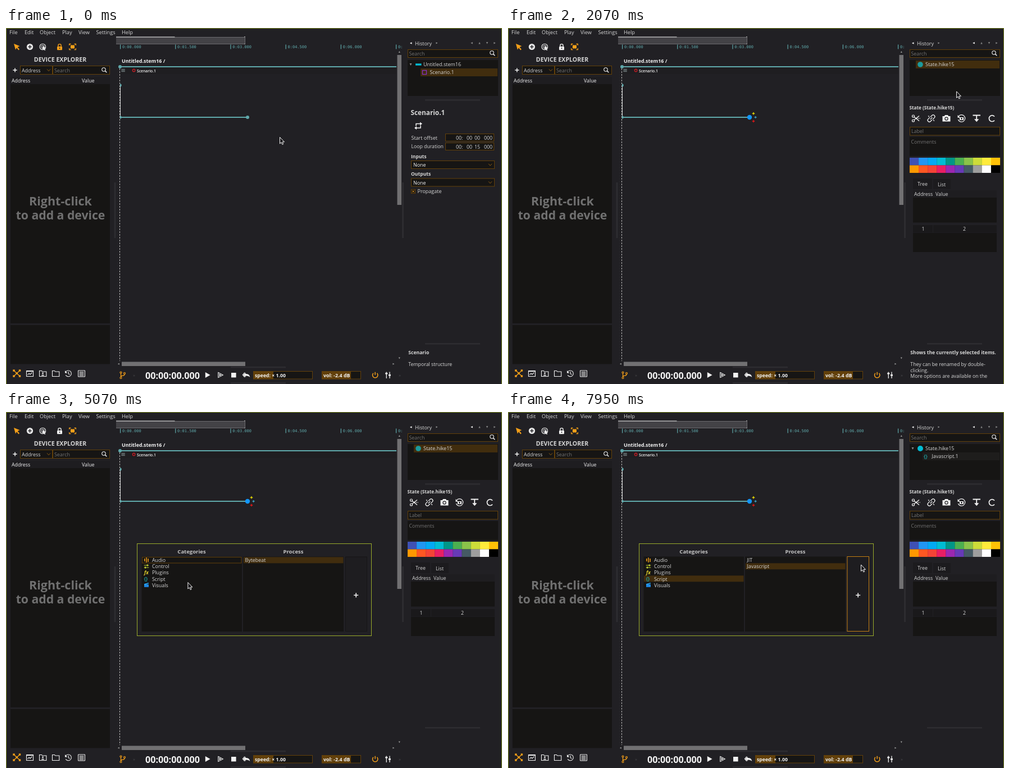
These frames come from a looping animation (883x634 px, 7.99 s). An HTML page:

```html
<!DOCTYPE html>
<html lang="en">
<head>
<meta charset="utf-8">
<title>Score editor</title>
<style>
html, body { margin: 0; width: 100%; height: 100%; overflow: hidden; background: #212024; }
svg { display: block; width: 883px; height: 634px; font-family: "Open Sans", "Noto Sans", sans-serif; }
text { white-space: pre; }
.mono { font-family: "DejaVu Sans Mono", monospace; }
</style>
</head>
<body>
<svg id="stage" viewBox="0 0 883 634" xmlns="http://www.w3.org/2000/svg"></svg>
<script>
const LOOP = 7990;
const WIN = '#212024', BASE = '#161514', BROWN = '#62400a', PICK = '#412d0e', GRIP = '#2d2c30';
const TEAL = '#5fa8aa', ORANGE = '#f6a019', TEXT = '#d6d6d6', DIM = '#737373', WHITE = '#f2f2f2', LIME = '#9aab2b';

// Drawing helpers, all returning SVG markup
const rect = (x, y, w, h, fill, extra = '') =>
  `<rect x="${x}" y="${y}" width="${w}" height="${h}" fill="${fill}" ${extra}/>`;
const box = (x, y, w, h, stroke = BROWN, fill = BASE) =>
  rect(x + .5, y + .5, w - 1, h - 1, fill, `stroke="${stroke}"`);
const dot = (x, y, r, fill, extra = '') => `<circle cx="${x}" cy="${y}" r="${r}" fill="${fill}" ${extra}/>`;
const ring = (x, y, r, stroke, w = 1) => dot(x, y, r, 'none', `stroke="${stroke}" stroke-width="${w}"`);
const line = (d, stroke = WHITE, w = 1, extra = '') =>
  `<path d="${d}" fill="none" stroke="${stroke}" stroke-width="${w}" ${extra}/>`;
const fill = (d, color = WHITE) => `<path d="${d}" fill="${color}"/>`;
const text = (x, y, s, size = 8.9, color = TEXT, extra = '') =>
  `<text x="${x}" y="${y}" font-size="${size}" fill="${color}" ${extra}>${s}</text>`;
const bold = (x, y, s, size, color = TEXT, extra = '') => text(x, y, s, size, color, 'font-weight="700" ' + extra);
const MID = 'text-anchor="middle"';
const group = (id, ...parts) => `<g id="${id}">${parts.join('')}</g>`;
const chevron = (x, y) => line(`M${x - 3} ${y - 1.7}l3 3.4l3 -3.4`, '#8a5a10');
const lens = (x, y) => ring(x - 1, y - 1, 3.2, WHITE, 1.1) + line(`M${x + 1.3} ${y + 1.3}l3 3`, WHITE, 1.5);
const plus = (x, y, r, color, w) => line(`M${x - r} ${y}h${2 * r}M${x} ${y - r}v${2 * r}`, color, w);
// Small triangle pointing by (dx, dy)
const tri = (x, y, r, dx, dy, color) =>
  fill(`M${x + dx * r} ${y + dy * r}L${x - dx * r - dy * r} ${y - dy * r - dx * r}L${x - dx * r + dy * r} ${y - dy * r + dx * r}Z`, color);

function menuBar() {
  const items = [[6, 'File'], [33, 'Edit'], [60, 'Object'], [100, 'Play'], [129, 'View'], [160.5, 'Settings'], [206, 'Help']];
  return items.map(([x, s]) => text(x, 11.3, s, 9.2)).join('');
}

function toolBar() {
  return fill('M14 28L24.5 32.3L20.6 34L24 38L22.3 39.4L19 35.3L17 38.8Z', ORANGE) +
    dot(42.5, 33.5, 5.6, WHITE) + plus(42.5, 33.5, 3.2, WIN, 1.6) +
    ring(65.3, 33.5, 5.3, WHITE, 1.1) + ring(65.3, 33.5, 2.8, WHITE) + fill('M65 32L71.5 36L68.6 36.6L70.3 39.5L68.7 40L67.3 37.2L65.2 39Z') +
    group('lock', rect(91, 33, 9, 6.3, 'currentColor', 'rx="1"'), line('M92.9 33V31.2a2.6 2.6 0 0 1 5.2 0V33', 'currentColor', 1.4), dot(95.5, 36, 1, WIN)) +
    rect(115, 30.5, 7, 6, ORANGE) +
    line('M112.7 31V28.5H115.5M121.5 28.5H124.3V31M124.3 36V38.6H121.5M115.5 38.6H112.7V36', ORANGE, 1.3);
}

function leftPanel() {
  const y = 615;
  return bold(96.5, 60, 'DEVICE EXPLORER', 10.6, TEXT, MID) +
    plus(16, 75, 3.6, WHITE, 1.5) +
    box(25, 67, 58, 16) + text(28, 78.6, 'Address') + chevron(76, 75) +
    box(83, 67, 102, 16) + text(86, 78.6, 'Search', 8.9, DIM) + lens(175, 75) +
    rect(8, 87, 177, 13, '#1e1d20') + text(10, 96.7, 'Address', 8.8, WHITE) + text(135, 96.7, 'Value', 8.8, WHITE) +
    rect(8, 100, 177, 426, BASE) + rect(8, 529, 177, 69.5, BASE) +
    bold(97, 315.5, 'Right-click', 21.5, '#707070', MID) + bold(97, 341.3, 'to add a device', 21.2, '#707070', MID) +
    line(`M14 ${y - 5}L24.5 ${y + 5}M24.5 ${y - 5}L14 ${y + 5}`, ORANGE, 1.2) +
    [[14, -5], [24.5, -5], [14, 5], [24.5, 5], [19.2, 0]].map(([x, d]) => rect(x - 1.7, y + d - 1.7, 3.4, 3.4, ORANGE)).join('') +
    line('M36.5 610.5H48.5V620.5H36.5ZM36.5 611.5H48.5M38.5 618l2.5 -3l2 2l3.5 -3.5', WHITE, 1.1) +
    line('M59.5 610.5h4l1.3 1.5h7v8.5H59.5Z', WHITE, 1.1) + dot(65.5, 614.8, 1.4, WHITE) + fill('M62.8 619.3a2.8 2.8 0 0 1 5.4 0Z') +
    line('M82.5 610.5h4l1.3 1.5h7v8.5H82.5Z', WHITE, 1.1) +
    line('M106.5 612.2a5.4 5.4 0 1 1 -.3 5.8M111.2 612v3.7l2.3 1.5', WHITE, 1.1) + fill('M105 610v4.4h4.2Z') +
    line('M128.5 610H140.5V621H128.5ZM130.5 612.7h8M130.5 614.8h8M130.5 616.9h8M130.5 619h8', WHITE);
}

function timeline() {
  let out = rect(196, 16, 229.5, 12.5, '#434246') + line('M196 16.5H425.5M425.5 15V29M196 28.5H425.5', '#6b6a6e') +
    line('M196 16H300.5', '#e0e0e0', 1.2) + line('M424 15.5h2M424 28.5h2', '#a0a0a0');
  const labels = ['0:00.000', '0:01.500', '0:03.000', '0:04.500', '0:06.000', '0:'];
  labels.forEach((s, i) => {
    const x = 203.5 + i * 98.2;
    out += rect(x - .5, 29.5, 1.2, 8, TEAL) + text(x + 3.4, 35.8, s, 7, TEAL, 'class="mono"');
  });
  return out;
}

function scoreView() {
  return bold(206, 62, 'Untitled.stem16 /', 8.9, WHITE) +
    rect(203, 71, 492, 11, '#1f1e21') + rect(203, 68, 492, 2, TEAL) + dot(203, 69, 3, TEAL) +
    line('M205.3 73.5h6.5M205.3 75.5h6.5M205.3 77.5h6.5', '#8d9c9d', .9) +
    ring(227.6, 75.5, 2.2, '#c01c24', 1.4) + text(233, 78.6, 'Scenario.1', 6.8, WHITE, 'font-weight="600"') +
    line('M202.5 72V593', '#b8b8b8', 1, 'stroke-dasharray="3 2"') +
    rect(203, 104, 1, 53, '#d4d4d4') +
    fill('M203 99.3a2.7 2.7 0 0 1 0 5.4ZM203 156.3a2.7 2.7 0 0 1 0 5.4Z', TEAL) +
    rect(203, 158, 227, 2, TEAL) + dot(430, 159, 3, TEAL) +
    group('picked', dot(430, 159, 4.2, '#1296ff'), plus(437, 152.3, 2.3, '#f0e000', 1.3), plus(440.6, 159, 2, '#3aa0c0', 1.3), plus(437, 166, 2.2, '#e01818', 1.3)) +
    rect(696.5, 48, 7.5, 267, '#717072') + rect(206, 594.5, 220, 7.5, '#717072') +
    tri(700.3, 42.5, 1.5, 0, -1, '#9a9a9a') + tri(700.3, 588, 1.5, 0, 1, '#9a9a9a') +
    tri(200.3, 598.2, 1.5, -1, 0, '#9a9a9a') + tri(690, 598.2, 1.5, 1, 0, '#9a9a9a');
}

function transport() {
  const y = 618;
  return ring(204.5, 613.5, 1.5, ORANGE, 1.2) + ring(204.5, 623, 1.5, ORANGE, 1.2) + ring(211, 615, 1.5, ORANGE, 1.2) +
    line('M204.5 615v6.5M211 616.5q0 2.5 -3 2.7q-3.5 .2 -3.5 2.3', ORANGE, 1.3) +
    text(226, 620.5, '»', 8, '#4a494d') + text(699, 620.5, '»', 8, '#4a494d') +
    bold(248, 624.6, '00:00:00.000', 16.2, WHITE) +
    fill(`M354.8 ${y - 5}L363.6 ${y}L354.8 ${y + 5}Z`) +
    line(`M377.8 ${y - 4.4}L386.3 ${y}L377.8 ${y + 4.4}Z`, WHITE, 1.1) + fill(`M379.5 ${y - 2}l4 2l-4 2Z`) +
    rect(401, 614, 8.6, 8.4, WHITE) +
    fill('M426.5 613.5V616H428q5.5 0 6.3 6q-2 -2.6 -6.3 -2.6h-1.5v2.6l-3.8 -4.2Z') + line('M425 613.7l-3.5 4.1l3.5 4', WHITE, 1.3) +
    box(440, 611, 106, 14.5) + rect(440, 611, 36, 14.5, BROWN) + bold(443, 621.5, 'speed: × 1.00', 8.7, WHITE) +
    box(562, 611, 70, 14.5) + rect(562, 611, 52, 14.5, BROWN) + bold(565, 621.5, 'vol: -2.4 dB', 8.9, WHITE) +
    line('M654 614.7a4.7 4.7 0 1 0 6.4 0M657.2 612.8v5', ORANGE, 1.5) +
    line('M677.3 612.5v11.5M683 612.5v11.5', WHITE, 1.3) + rect(675.3, 614, 4, 2.6, WHITE) + rect(681, 617, 4, 2.6, WHITE);
}

function grips() {
  return rect(192.5, 275, 3, 99, GRIP) + rect(705, 275, 3, 99, GRIP) +
    [[746, 127], [746, 561], [400, 602.8], [400, 631]].map(([x, y]) => rect(x, y, 98, 2.6, GRIP)).join('');
}

function history() {
  return tri(720.7, 27, 1.8, -1, 0, WHITE) + text(728, 30.6, 'History', 9) + tri(767, 26.7, 1.5, 1, 0, '#9a9a9a') +
    group('back', tri(829, 26.7, 1.8, -1, 0, 'currentColor')) +
    tri(843, 26.7, 1.7, 0, -1, '#858585') + tri(856.5, 26.7, 1.7, 0, 1, '#858585') + tri(870, 26.7, 1.7, 1, 0, '#858585') +
    box(715, 38, 161, 15) + text(717.5, 48.8, 'Search', 8.9, DIM) + lens(866, 45) +
    rect(715, 57, 161, 64, BASE) +
    group('treeA', tri(720.5, 65, 2, 0, 1, '#8a8a8a'), rect(729, 63.3, 10.5, 3.4, '#00bcd4'), text(743, 68.4, 'Untitled.stem16', 9),
      rect(738, 72, 137, 14, PICK), rect(741.5, 75.5, 7, 7, 'none', 'stroke="#8730c4" stroke-width="1.3"'), text(754.5, 82.4, 'Scenario.1', 8.9)) +
    group('treeB', rect(726, 58, 149, 14, PICK), dot(734, 65, 4.8, '#1c9a9c')) +
    group('treeC', rect(738, 72, 137, 14, '#1e1d1c'), tri(720.5, 65, 2, 0, 1, '#8a8a8a'), dot(734, 65, 5, '#00bcd4'),
      text(740, 82.2, '{}', 9, '#1ba5a5', 'font-weight="600"'), text(754.5, 82.4, 'Javascript.1', 8.9)) +
    group('stateName', text(743, 68.4, 'State.hike15', 9));
}

function timeField(y, seconds) {
  const parts = [[801, '00:'], [820, '00'], [834, seconds], [851, '000']];
  return box(782, y, 87, 14) + parts.map(([x, s]) => text(x, y + 10.6, s, 8.8)).join('');
}

const combo = y => box(721, y, 149, 15) + text(725, y + 11.2, 'None', 8.9, WHITE) + chevron(862, y + 7.5);

function scenarioInspector() {
  return group('inspectA', bold(720.5, 154.5, 'Scenario.1', 11.8),
    line('M730 174.5V170.5H739M738 173.5V178H729', WHITE, 1.5), fill('M737 167.5l4 3l-4 3ZM731 175l-4 3l4 3Z'),
    text(721.5, 198.6, 'Start offset', 9), timeField(188, '00'),
    text(721.5, 214, 'Loop duration', 8.7), timeField(204, '15'),
    bold(721, 231.5, 'Inputs', 8.6), combo(236),
    bold(721, 263, 'Outputs', 8.6), combo(267.5),
    box(721, 287, 8, 8), line('M723 289l4 4M727 289l-4 4', '#c58014'), text(732.5, 294.3, 'Propagate', 9));
}

function palette() {
  const colors = ('3f51b5 2196f3 03a9f4 00bcd4 009688 4caf50 8bc34a cddc39 ffeb3b ffc107 ' +
    'ff9800 ff5722 f44336 e91e63 9c27b0 673ab7 455a64 9e9e9e ffffff 000000').split(' ');
  return colors.map((c, i) => rect(715 + i % 10 * 16.1, i < 10 ? 231 : 244.5, 16.2, 13.5, '#' + c)).join('');
}

function stateIcons() {
  return ring(721.5, 157, 2, WHITE, 1.2) + ring(721.5, 165, 2, WHITE, 1.2) + line('M723 158.2L732 165.5M723 163.8L732 156.5', WHITE, 1.4) +
    line('M727 161h7', WHITE, 1.2, 'stroke-dasharray="2 1"') +
    line('M752 158.5l2.8 -2.8a2.9 2.9 0 0 1 4.2 4.2l-2.8 2.8M755 163.5l-2.8 2.8a2.9 2.9 0 0 1 -4.2 -4.2l2.8 -2.8M751.7 162.8l3.7 -3.7M748 156.5l2 1.5M759 165.5l-2 -1.5', WHITE, 1.3) +
    fill('M773.5 157h3.3l1.2 -2h5l1.2 2h3.3v9.5h-14Z') + ring(780.5, 161.5, 2.6, WIN, 1.2) +
    line('M802 157.5a6.3 6.3 0 1 1 -.6 5.5', WHITE, 1.3) + fill('M800.5 155v4.8h4.5Z') + rect(804, 159, 7, 5, WHITE) + dot(807.5, 161.5, 1.4, WIN) +
    line('M827.5 155.5h13.5M834.2 155.5v8', WHITE, 1.9) + fill('M830 162.3h8.4l-4.2 5Z') +
    line('M866 157.7a5.4 5.4 0 1 0 0 6.8', WHITE, 1.7);
}

function stateInspector() {
  return group('inspectB', bold(714.5, 145, 'State (State.hike15)', 8.2), stateIcons(),
    box(715, 176, 161, 15.5), text(718, 187.4, 'Label', 8.8, DIM),
    rect(715, 194, 161, 34, BASE), text(717.5, 206.3, 'Comments', 8.8, DIM), palette(),
    rect(721, 268, 34, 19, '#1c1b1e'), rect(757, 269, 31, 18, '#1c1b1e'), text(729, 281, 'Tree'), text(765, 281.5, 'List'),
    rect(721, 289, 149, 13, '#1e1d20'), text(723, 298.8, 'Address', 8.8), text(761, 298.8, 'Value', 8.8), rect(721, 302, 149, 44.5, BASE),
    rect(721, 351, 149, 13.5, '#1a191b'), rect(756, 351, 1, 13.5, WIN), text(739, 361.3, '1', 8.8, TEXT, MID), text(812.5, 361.3, '2', 8.8, TEXT, MID),
    rect(721, 365, 149, 34, BASE));
}

function status(id, title, ...rows) {
  return group(id, bold(716.3, 581, title, 8.6), rows.map((s, i) => text(716.3, 602 + i * 10.5, s, 8.78)).join(''));
}

function processDialog() {
  const row = (x, i, s) => text(x, 267.2 + i * 11.1, s, 8.9);
  const pick = (x, w, i) => rect(x, 258.3 + i * 11, w, 11, PICK);
  return group('dialog', box(233, 234, 418, 165, LIME, WIN),
    bold(330.5, 252, 'Categories', 9.5, '#c4c4c4', MID), bold(511.5, 252, 'Process', 9.5, '#c4c4c4', MID),
    rect(241.5, 257.5, 178.5, 133.5, BASE), rect(422, 257.5, 179, 133.5, BASE),
    group('audioFocus', box(242, 258, 177.5, 11.5)), group('scriptPick', pick(242, 177.5, 3)),
    rect(246, 261, 1.5, 5, ORANGE), rect(249.2, 259.3, 1.5, 8.6, ORANGE), rect(252.3, 261, 1.5, 6, ORANGE),
    line('M245.7 273h8.6M245.7 277h8.6', '#c6d832', 1.2), rect(250.7, 271.5, 2, 3, '#c6d832'), rect(247, 275.5, 2, 3, '#c6d832'),
    bold(246, 289, 'fx', 8.5, '#e8d62c', 'font-style="italic"'),
    text(245.5, 300, '{}', 9, '#1ba5a5', 'font-weight="600"'),
    rect(246, 307, 8, 4.8, '#1e88e5'), fill('M245.8 306.3l7.8 -2.4l.6 1.6l-7.8 2.4Z', '#29a8f5'),
    ['Audio', 'Control', 'Plugins', 'Script', 'Visuals'].map((s, i) => row(260, i, s)).join(''),
    group('firstPick', pick(423, 177.5, 0)), group('secondPick', pick(423, 177.5, 1)),
    group('audioList', row(425.5, 0, 'Bytebeat')), group('scriptList', row(425.5, 0, 'JIT'), row(425.5, 1, 'Javascript')),
    box(604, 257.5, 39, 133.5, '#161517', '#1e1d20'), group('hover', box(603.5, 257, 39.5, 134, '#c58014', 'none')),
    group('press', rect(605, 259, 37, 131, PICK)), plus(623.2, 326.3, 4, WHITE, 1.6));
}

const stage = document.getElementById('stage');
stage.innerHTML = rect(0, 0, 883, 634, WIN) + menuBar() + toolBar() + leftPanel() + timeline() + scoreView() + transport() +
  grips() + history() + scenarioInspector() + stateInspector() +
  status('helpScenario', 'Scenario', 'Temporal structure') +
  status('helpInterval', 'Interval', 'A span of time which can contain', 'processes.') +
  status('helpItems', 'Shows the currently selected items.', 'They can be renamed by double-', 'clicking.', 'More options are available on the') +
  box(0, 0, 883, 635, '#7d8c25', 'none') + processDialog() +
  group('menu', rect(784.5, 66.5, 70, 15, BASE), group('menuPick', rect(784.5, 66.5, 70, 15, PICK)), text(796.5, 77.4, 'Add process', 8.8)) +
  group('cursor', '<path d="M.5 .5V12L3.1 9.6L4.9 13.5L6.7 12.7L5 8.9H8.5Z" fill="#18171a" stroke="#f4f4f4"/>');

const el = {};
stage.querySelectorAll('g[id]').forEach(g => el[g.id] = g);

// Pointer waypoints: time, x, y
const path = [
  [0, 487, 194], [100, 487, 194], [580, 426, 161], [780, 426, 161], [880, 428.5, 162.5], [1020, 428.5, 162.5], [1190, 428, 157],
  [1800, 428, 157], [2070, 798, 112.5], [2580, 785, 66], [3030, 785, 66], [3230, 801, 72.5], [4250, 801, 72.5],
  [5030, 333, 301], [5070, 323.5, 303], [5300, 292, 306], [5610, 276, 297], [6050, 276, 297], [6190, 411.5, 281],
  [6360, 442, 274], [6700, 442, 274], [6870, 641, 295], [7070, 641, 295], [7140, 636, 295], [7780, 636, 295], [7950, 628, 271.5], [LOOP, 628, 271.5]
];

function pointer(t) {
  const i = path.findIndex(p => p[0] > t);
  const [t0, x0, y0] = path[i - 1], [t1, x1, y1] = path[i];
  const k = (t - t0) / (t1 - t0);
  return [x0 + (x1 - x0) * k, y0 + (y1 - y0) * k];
}

// Visible spans: start, end
const spans = {
  helpScenario: [0, 460], helpInterval: [460, 1090], helpItems: [2010, 2720],
  treeA: [0, 1430], inspectA: [0, 1430], inspectB: [1430, LOOP], picked: [1430, LOOP], stateName: [1430, LOOP],
  treeB: [1430, 7550], treeC: [7550, LOOP], menu: [2720, 4010], menuPick: [3060, 4010], dialog: [4010, LOOP],
  audioFocus: [4010, 5810], audioList: [4010, 5810], scriptPick: [5810, LOOP], scriptList: [5810, LOOP],
  firstPick: [4010, 6560], secondPick: [6560, LOOP], hover: [6840, LOOP], press: [7410, 7550]
};

function draw(t) {
  for (const id in spans) {
    const [from, to] = spans[id];
    el[id].style.display = t >= from && t < to ? '' : 'none';
  }
  el.lock.style.color = t < 100 ? ORANGE : WHITE;
  el.back.style.color = t < 1430 ? '#858585' : WHITE;
  el.cursor.setAttribute('transform', `translate(${pointer(t).join(' ')})`);
}

const start = performance.now();
function tick(now) {
  draw(Math.max(0, now - start) % LOOP);
  requestAnimationFrame(tick);
}
draw(0);
requestAnimationFrame(tick);
</script>
</body>
</html>
```
